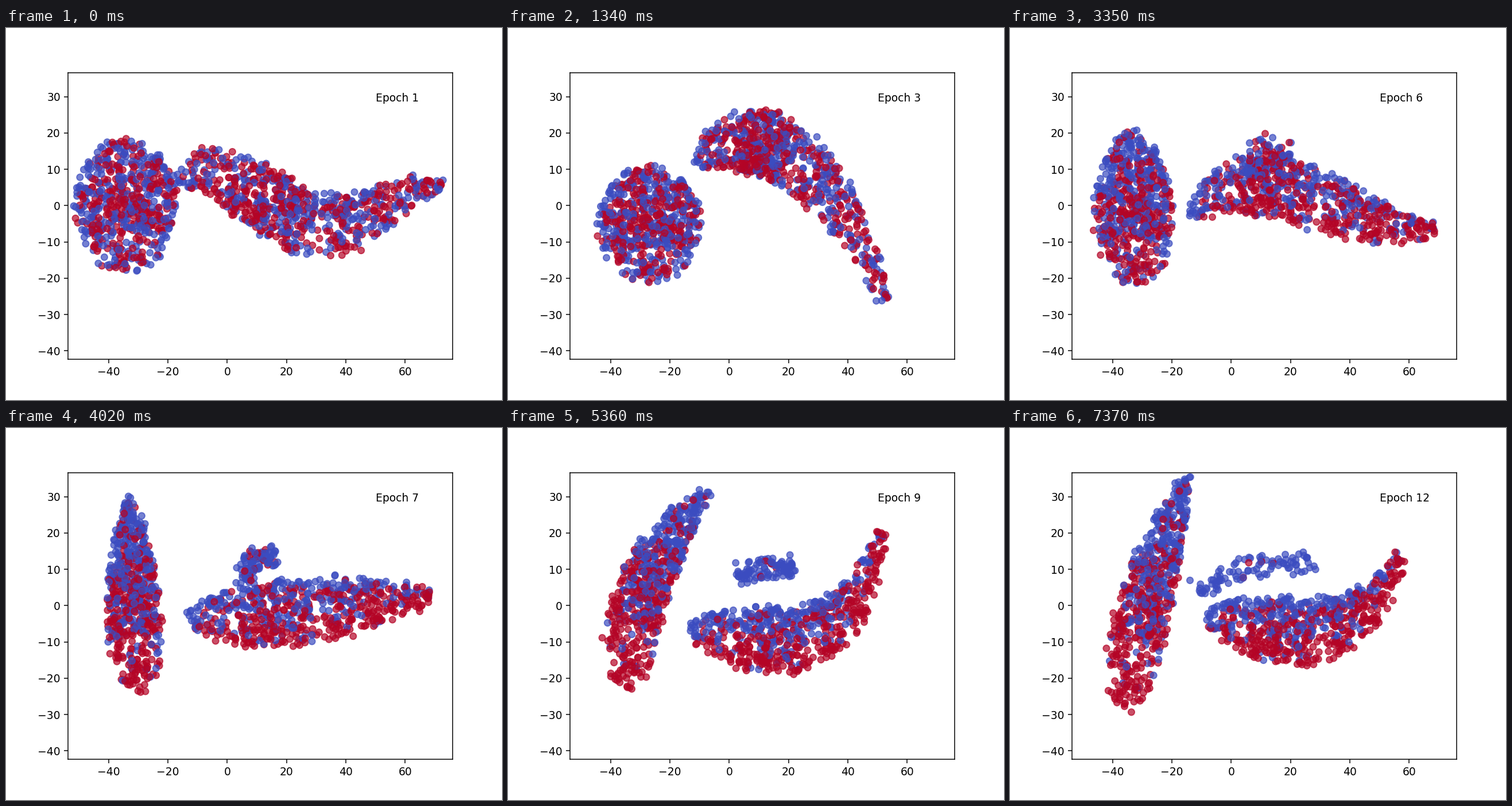
These frames come from a looping animation (864x648 px, 8000 ms). A matplotlib script:

```python
import numpy as np
import matplotlib.pyplot as plt
from matplotlib.animation import FuncAnimation

LOOP, STEP, HOLD = 8000, 40, 670   # ms
EPOCHS = 12
BODY, TAIL, ISLET = 620, 640, 95   # points per part
TAIL_WIDTH = 10.5

# Spines at the turning points of training: body, tail, islet.
# Epochs in between are blended.
POSES = {
    1: ([(-34.3, -18.5), (-34.3, 18.5)],
        [(-16, 6), (6, 5), (29, -5), (51, -1), (74, 4.5)], None),
    3: ([(-27, -21), (-27, 11)],
        [(-11, 12), (11, 17), (33, 4), (53.5, -28)], None),
    5: ([(-34, -20), (-34, 11.5)],
        [(-15, -1), (13, 13.5), (41, -4), (69, -15)], None),
    7: ([(-30, -24), (-32, 3), (-33, 30)],
        [(-13, -3), (15, -2.5), (42, 0), (70, 2.5)],
        [(5, 6), (8, 12), (17, 13.5)]),
    8: ([(-33, -21), (-28, 7), (-8.5, 31)],
        [(-13, -7), (12, -10.5), (36, -5), (50, 25)],
        [(3, 8), (12, 9), (22, 4)]),
    10: ([(-36, -26), (-28, 6), (-4, 32)],
         [(-13, -5), (14, -9), (36, -3), (55, 19)],
         [(1, 10), (11, 11), (22, 17)]),
    12: ([(-36, -29), (-28, 3.5), (-14, 36)],
         [(-8, -3), (16, -7), (39, -4), (58, 14.5)],
         [(-12, 4), (5, 10), (28, 12)]),
}

rng = np.random.default_rng(7)


def along(spine, t, offset):
    """Points beside the polynomial curve through the spine's key points."""
    knots = np.linspace(0, 1, len(spine))
    cx, cy = np.polyfit(knots, np.array(spine, float), len(spine) - 1).T
    tx, ty = np.polyval(np.polyder(cx), t), np.polyval(np.polyder(cy), t)
    size = np.hypot(tx, ty)
    return np.column_stack([np.polyval(cx, t) - offset * ty / size,
                            np.polyval(cy, t) + offset * tx / size])


def profile(t):
    return 0.1 + np.sin(np.pi * t) ** 0.6 * (1 - 0.5 * t)


# Every point keeps its place within its part for the whole loop.
r = rng.random(BODY) ** 0.6
angle = rng.uniform(0, 2 * np.pi, BODY)
across, up = r * np.cos(angle), r * np.sin(angle)

grid = np.linspace(0, 1, 200)
mass = np.cumsum(profile(grid) + 0.2)
tail_t = np.interp(rng.random(TAIL), mass / mass[-1], grid)
tail_u = rng.uniform(-1, 1, TAIL)
islet_t, islet_u = rng.random(ISLET), rng.uniform(-1, 1, ISLET)

total = BODY + TAIL + ISLET
chance = rng.random(total)
order = rng.permutation(total)


def place(epoch):
    body, tail, islet = POSES[epoch]
    wide, narrow = (17.5, 17.5) if islet is None else (12.5, 5)
    t = (1 + up) / 2
    parts = [along(body, t, -across * (wide + (narrow - wide) * t)),
             along(tail, tail_t, tail_u * TAIL_WIDTH * profile(tail_t))]
    if islet is None:
        t = 0.2 + 0.25 * islet_t
        parts.append(along(tail, t, islet_u * TAIL_WIDTH * profile(t)))
    else:
        parts.append(along(islet, islet_t, 2.8 * islet_u))
    return np.concatenate(parts)


def labels(epoch):
    """Classes start mixed and drift apart: red low and outside, blue inside."""
    sep = np.clip((epoch - 4) / 4, 0, 1)
    share = np.concatenate([
        0.52 + 0.3 * (0.5 - r) * (1 - sep) - 0.55 * sep * up,
        0.54 + sep * (0.3 * (tail_t - 0.3) - 0.4 * tail_u),
        np.full(ISLET, 0.5 - 0.4 * sep)])
    return (chance < share).astype(float)


def cloud(epoch):
    before = max(k for k in POSES if k <= epoch)
    after = min(k for k in POSES if k >= epoch)
    mix = (epoch - before) / max(after - before, 1)
    xy = (1 - mix) * place(before) + mix * place(after)
    xy += rng.normal(0, 0.45, xy.shape)
    return xy[order], labels(epoch)[order]


clouds = [cloud(k) for k in range(1, EPOCHS + 1)]

fig, ax = plt.subplots(figsize=(6.4, 4.8), dpi=135)
ax.set_xlim(-53.67, 75.92)
ax.set_ylim(-42.27, 36.6)
xy, red = clouds[0]
dots = ax.scatter(*xy.T, c=red, cmap="coolwarm", vmin=0, vmax=1, alpha=0.7)
label = ax.text(0.8, 0.9, "Epoch 1", transform=ax.transAxes)


def update(i):
    k = min((i * STEP + STEP - 1) // HOLD, EPOCHS - 1)
    xy, red = clouds[k]
    dots.set_offsets(xy)
    dots.set_array(red)
    label.set_text(f"Epoch {k + 1}")
    return dots, label


anim = FuncAnimation(fig, update, frames=LOOP // STEP, interval=STEP,
                     repeat=True, repeat_delay=0)
plt.show()
```
